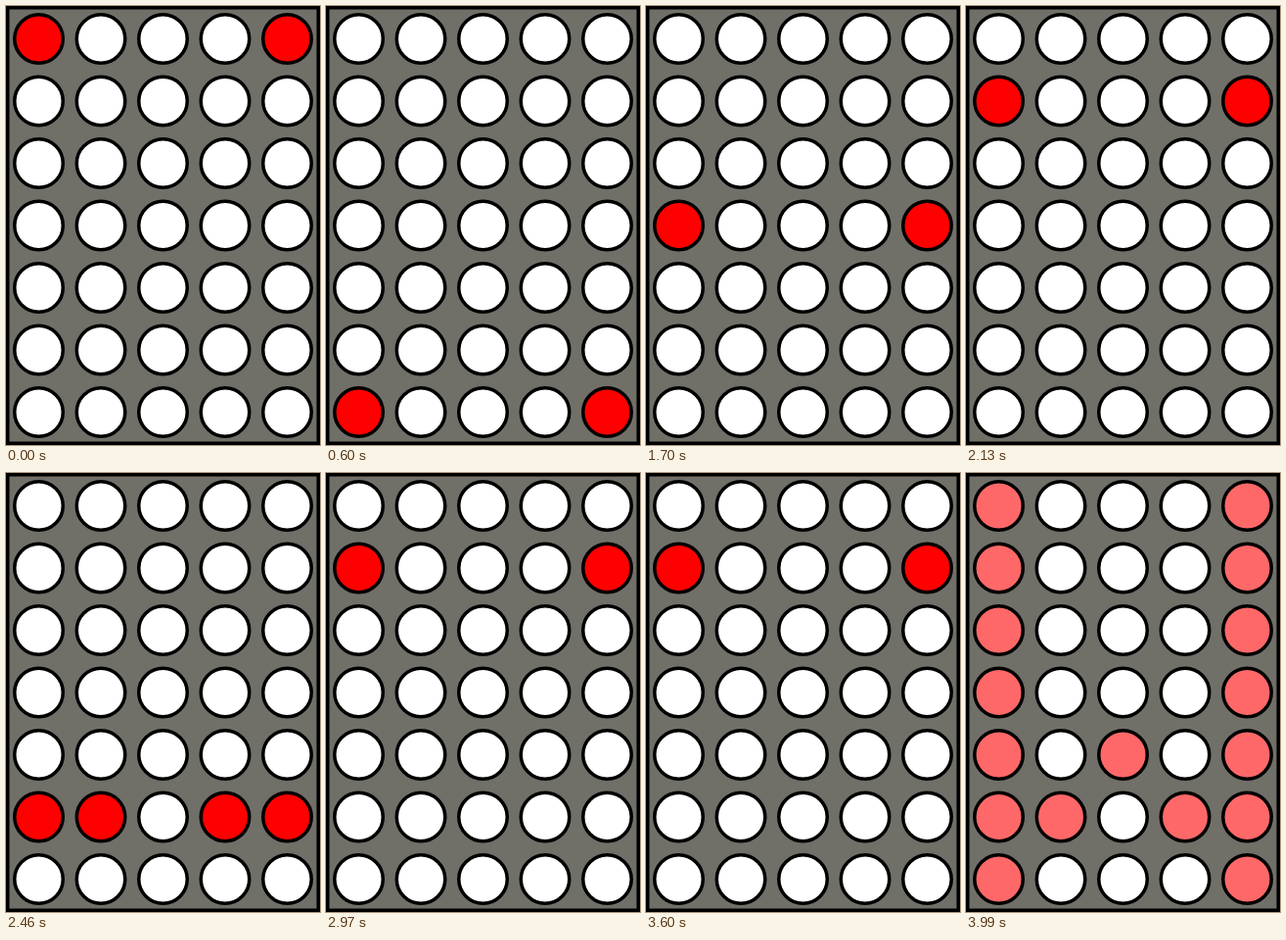
An HTML page for the animation above (5.99 s loop, 321 px wide and 448 px high).

```html
<!DOCTYPE html>
<html lang="en">
<head>
<meta charset="utf-8">
<title>LED matrix row scan</title>
<style>
  html, body { margin: 0; width: 100%; height: 100%; overflow: hidden; background: #706f68; }
  svg { display: block; }
  g { stroke: #000; stroke-width: 3.5; }
</style>
</head>
<body>
<svg width="321" height="448" viewBox="0 0 321 448">
  <rect width="321" height="448"/>
  <rect x="3.5" y="3.5" width="314" height="441" fill="#706f68"/>
  <g id="leds"></g>
</svg>
<script>
const GLYPH = ["#...#", "#...#", "#...#", "#...#", "#.#.#", "##.##", "#...#"];
const SLOW = 100, FAST = 30;
const FAST_START = 3 * 7 * SLOW;
const SCAN_END = FAST_START + 9 * 7 * FAST;
const LOOP = SCAN_END + 2000;
const PITCH = 63.5, FIRST = 33.5;

const group = document.getElementById("leds");
const leds = GLYPH.map((line, row) => [...line].map((mark, col) => {
  const led = document.createElementNS("http://www.w3.org/2000/svg", "circle");
  led.setAttribute("cx", FIRST + col * PITCH);
  led.setAttribute("cy", FIRST + row * PITCH);
  led.setAttribute("r", 24.75);
  group.append(led);
  return { led, on: mark === "#" };
}));

// Row being scanned, or -1 while the whole glyph glows.
function activeRow(t) {
  if (t >= SCAN_END) return -1;
  const step = t < FAST_START ? t / SLOW : (t - FAST_START) / FAST;
  return Math.floor(step) % 7;
}

function draw(t) {
  const active = activeRow(t);
  leds.forEach((line, row) => line.forEach(({ led, on }) => {
    const lit = active < 0 ? "#ff6868" : row === active ? "#f00" : "#fff";
    led.setAttribute("fill", on ? lit : "#fff");
  }));
}

const start = performance.now();
function tick() {
  draw((performance.now() - start) % LOOP);
  requestAnimationFrame(tick);
}
tick();
</script>
</body>
</html>
```
